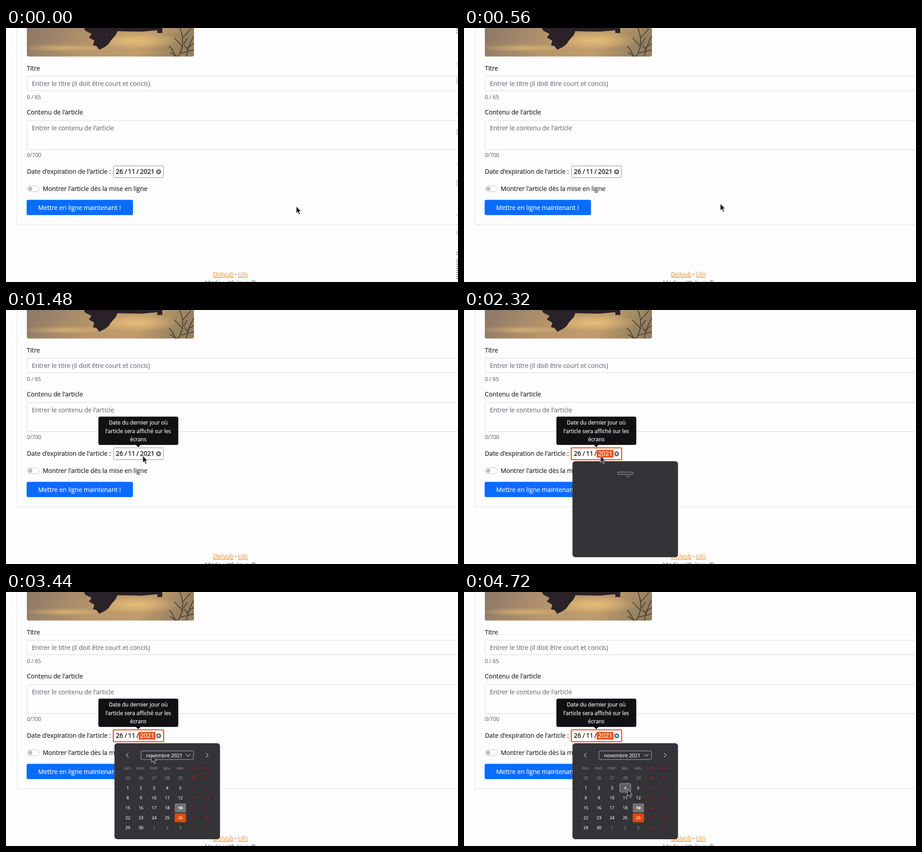
Recreate the animation shown at these times as an HTML page. Size 998 by 561 pixels, loop 4.76 s.

```html
<!DOCTYPE html>
<html lang="fr">
<head>
<meta charset="utf-8">
<title>Formulaire d'article</title>
<style>
  html, body { margin: 0; width: 100%; height: 100%; overflow: hidden; background: #fdfdfd; }
  svg { display: block; width: 998px; height: 561px; }
  text {
    font: 13.8px "Open Sans", "Noto Sans", sans-serif;
    color: #24272c; fill: currentColor; stroke: currentColor; stroke-width: .22px;
  }
  .hint { font-size: 13.95px; color: #70757e; }
  .small { font-size: 12px; color: #6f747b; }
  .date { font-size: 14px; color: #1b1b20; stroke-width: .4px; }
  .picked { color: #ffe4d8; }
  .light { color: #f2f7ff; }
  .link { color: #f2a04a; text-decoration: underline; }
  .field { fill: #fefefe; stroke: #d3d6dd; }
  .tip text { font-size: 11.85px; color: #f4f4f4; text-anchor: middle; }
  .cal text { font-size: 9.2px; color: #ededf0; text-anchor: middle; }
  .cal .month { font-size: 11px; }
  .cal .dim { color: #88888d; }
  .cal .off { color: #94202a; }
  .cal .now { font-weight: 700; color: #fff; }
  .line { fill: none; stroke: #b4b4b8; }
  .twigs { fill: none; stroke: #453a34; stroke-width: 1.8; }

  .cursor, .tip, .edge, .focus, .blur, .popup, .blank, .full, .hover {
    animation: 4760ms step-end infinite;
  }
  .cursor { animation-name: move; }
  .tip { animation-name: tip; animation-timing-function: linear; }
  .edge { animation-name: edge; }
  .focus { animation-name: focus; }
  .blur { animation-name: blur; }
  .popup { animation-name: popup; }
  .blank { animation-name: blank; }
  .full { animation-name: full; }
  .hover { animation-name: hover; }

  @keyframes move {
    0% { transform: translate(641px, 394px); animation-timing-function: ease-in-out; }
    11.76% { transform: translate(566px, 388px); animation-timing-function: ease-in; }
    23.53% { transform: translate(505px, 380px); animation-timing-function: ease-out; }
    29.41% { transform: translate(302px, 322px); animation-timing-function: linear; }
    46.22%, 68.07% { transform: translate(301.5px, 322px); animation-timing-function: ease-in-out; }
    78.15%, 80.67% { transform: translate(357px, 430px); animation-timing-function: ease-in-out; }
    86.13%, 100% { transform: translate(361px, 436px); }
  }
  @keyframes tip { 0%, 27.73% { opacity: 0; } 30.88%, 100% { opacity: 1; } }
  @keyframes edge { 0% { opacity: 1; } .84%, 100% { opacity: 0; } }
  @keyframes focus { 0% { opacity: 0; } 46.22%, 100% { opacity: 1; } }
  @keyframes blur { 0% { opacity: 1; } 46.22%, 100% { opacity: 0; } }
  @keyframes popup { 0% { opacity: 0; } 47.9%, 100% { opacity: 1; } }
  @keyframes blank { 0% { opacity: 1; } 49.58%, 100% { opacity: 0; } }
  @keyframes full { 0% { opacity: 0; } 49.58%, 100% { opacity: 1; } }
  @keyframes hover { 0% { opacity: 0; } 76.05%, 100% { opacity: 1; } }
</style>
</head>
<body>
<svg viewBox="0 0 998 561">
  <defs>
    <linearGradient id="sky" x2="1" y2=".12">
      <stop offset="0" stop-color="#8a7767"/>
      <stop offset=".45" stop-color="#b8966c"/>
      <stop offset=".75" stop-color="#c09c6c"/>
      <stop offset="1" stop-color="#94805f"/>
    </linearGradient>
    <radialGradient id="glow">
      <stop offset="0" stop-color="#e6bd78"/>
      <stop offset="1" stop-color="#e6bd78" stop-opacity="0"/>
    </radialGradient>
    <clipPath id="photo"><path d="M46 0H415V59Q415 63 411 63H50Q46 63 46 59Z"/></clipPath>
  </defs>
  <rect width="998" height="561" fill="#fdfdfd"/>
  <path d="M24.5-5V430Q24.5 434.5 29 434.5H1005" fill="none" stroke="#dcdde6"/>

  <g clip-path="url(#photo)">
    <rect x="46" width="369" height="63" fill="url(#sky)"/>
    <ellipse cx="285" cy="28" rx="100" ry="20" fill="url(#glow)"/>
    <ellipse cx="130" cy="44" rx="100" ry="9" fill="url(#glow)" opacity=".7"/>
    <path d="M172 0H345V11H334V5L300 8 246 7 242 16 233 26 226 36 218 42 206 48 200 40 192 38 195 28 183 21 189 13 175 6Z" fill="#2a2228"/>
    <path class="twigs" d="M380 63Q398 35 384 0M398 63Q406 30 415 18M374 63Q368 46 360 40M391 42L372 22M400 44L415 34M384 56L415 48M390 22L408 2M378 63L362 54M392 36L400 22M402 50L394 38"/>
  </g>

  <text x="46" y="93.5">Titre</text>
  <rect class="field" x="46.5" y="106.5" width="970" height="32" rx="3"/>
  <text class="hint" x="57" y="128">Entrer le titre (il doit être court et concis)</text>
  <text class="small" x="46" y="157">0 / 65</text>
  <text x="46" y="191">Contenu de l'article</text>
  <rect class="field" x="46.5" y="204.5" width="970" height="64" rx="3"/>
  <text class="hint" x="57" y="225.5">Entrer le contenu de l'article</text>
  <text class="small" x="46" y="284.5">0/700</text>

  <text x="46" y="322">Date d'expiration de l'article :</text>
  <rect class="blur" x="237.5" y="304.5" width="110" height="26" rx="2" fill="#fff" stroke="#8587a3"/>
  <g class="focus">
    <rect x="235" y="302.5" width="115" height="30" rx="4" fill="#fbd9ca"/>
    <rect x="237" y="304.5" width="111" height="26" rx="2" fill="#fff" stroke="#e4501c" stroke-width="2"/>
    <rect x="293" y="309" width="37" height="17" fill="#e95420"/>
  </g>
  <text class="date" y="322"><tspan x="242.5">26</tspan><tspan x="262">/</tspan><tspan x="269.5">11</tspan><tspan x="288">/</tspan></text>
  <text class="date blur" x="296" y="322">2021</text>
  <text class="date picked focus" x="296" y="322">2021</text>
  <circle cx="337" cy="317.5" r="5.5" fill="#6c6c74"/>
  <path d="M335 315.5l4 4m0-4l-4 4" stroke="#fff" stroke-width="1.4"/>

  <rect x="46.5" y="348.5" width="27" height="13" rx="6.5" fill="#fff" stroke="#c2c3c9"/>
  <circle cx="53.5" cy="355" r="4.7" fill="#bdbdc2"/>
  <text x="81" y="360">Montrer l'article dès la mise en ligne</text>
  <rect x="45.6" y="379.5" width="234.8" height="33.7" rx="3.5" fill="#096cfd"/>
  <text class="light" x="71" y="401.5">Mettre en ligne maintenant !</text>

  <text class="link" x="457" y="549">Dolvub</text>
  <text x="505.5" y="549">·</text>
  <text class="link" x="512" y="549">Uln</text>
  <text class="hint" x="495.5" y="568" text-anchor="middle">Made with love ©</text>

  <g class="tip">
    <rect x="204" y="235.5" width="176.4" height="62.4" rx="4" fill="#111114"/>
    <path d="M286 297h12l-6 6z" fill="#111114"/>
    <text x="292" y="253">Date du dernier jour où</text>
    <text x="292" y="271.5">l'article sera affiché sur les</text>
    <text x="292" y="290">écrans</text>
  </g>

  <g class="popup cal">
    <rect x="239.5" y="334" width="233" height="212" rx="6" fill="#343337"/>
    <g class="blank line">
      <rect x="339.5" y="358" width="34" height="5" rx="2"/>
      <path d="M357 365l5 5 5-5"/>
    </g>
    <g class="full">
      <path class="line" d="M270.5 355.5l-5 5 5 5M441.5 355.5l5 5-5 5M397.5 358l5 5 5-5" stroke-width="1.2"/>
      <rect class="line" x="298" y="351" width="116" height="19" rx="2"/>
      <text class="month" x="349.5" y="364.5">novembre 2021</text>
      <rect x="372.5" y="467" width="25" height="20" rx="2" fill="#747377"/>
      <rect x="372.5" y="489" width="25" height="19.5" rx="2" fill="#e2480e"/>
      <rect class="hover" x="344" y="423" width="24" height="19" rx="2.5" fill="#5b5b62" stroke="#aeaeb6"/>
      <g id="days"></g>
    </g>
  </g>

  <g class="edge" id="ticks"></g>
  <path class="cursor" d="M0 0V15L3.5 12 6 18 8.5 17 6 11H10.5Z" fill="#1d1b20" stroke="#e8e8ec" stroke-width=".9"/>
</svg>
<script>
  const add = (parent, tag, attrs, text = '') => {
    const el = document.createElementNS('http://www.w3.org/2000/svg', tag);
    for (const key in attrs) el.setAttribute(key, attrs[key]);
    el.textContent = text;
    document.getElementById(parent).append(el);
  };
  const label = (col, y, cls, text) =>
    add('days', 'text', { x: 269 + 29 * col, y, class: cls }, text);

  ['lun.', 'mar.', 'mer.', 'jeu.', 'ven.', 'sam.', 'dim.'].forEach((name, col) =>
    label(col, 392, col > 4 ? 'off' : 'dim', name));

  for (let i = 0; i < 42; i++) {
    const date = new Date(2021, 9, 25 + i), day = date.getDate(), col = i % 7;
    const inMonth = date.getMonth() === 10;
    const cls = col > 4 ? 'off' : !inMonth ? 'dim' : day === 19 ? 'now' : '';
    label(col, 414 + 22 * Math.floor(i / 7), cls, day);
  }

  // coloured ticks along the right border: y, count, colour
  [[1, 3, '#555'], [77, 2, '#e9b45c'], [112, 3, '#5b7fd0'], [190, 1, '#bbb'],
   [225, 3, '#6b9a76'], [300, 1, '#e9b45c'], [337, 3, '#5b7fd0'], [413, 1, '#c48ad0'],
   [450, 2, '#5b7fd0'], [495, 2, '#555'], [512, 10, '#555']].forEach(([y, n, fill]) => {
    for (let i = 0; i < n; i++)
      add('ticks', 'rect', { x: 994, y: y + 4.5 * i, width: 4, height: 1.2, fill });
  });
</script>
</body>
</html>
```
